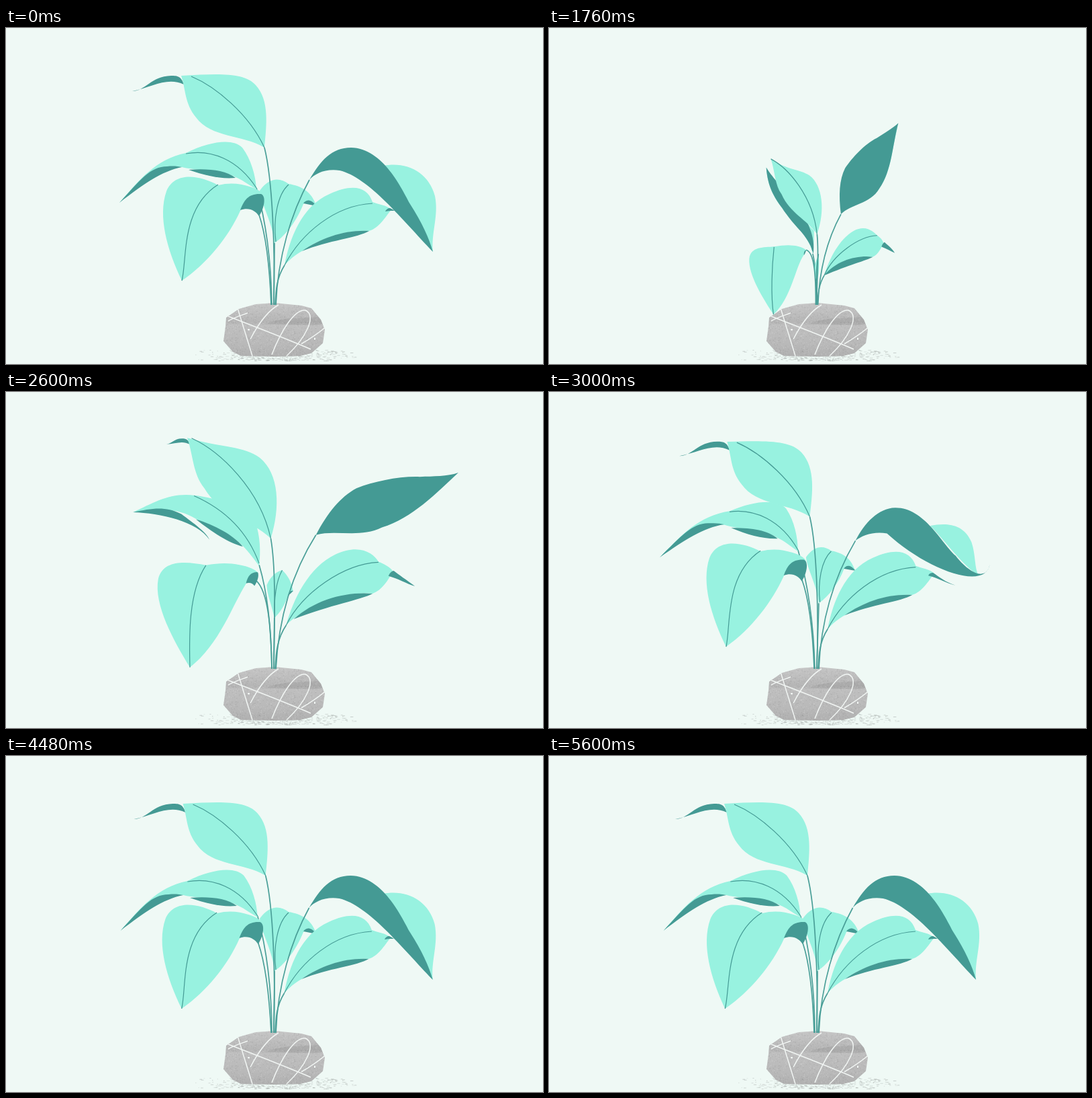
Write an HTML page with a canvas that moves like this. It is 800 by 500 pixels and loops after 5680 ms.

```html
<!DOCTYPE html>
<html lang="en">
<head>
<meta charset="utf-8">
<title>Growing plant</title>
<style>
html, body { margin: 0; width: 100%; height: 100%; overflow: hidden; background: #eff9f5; }
canvas { display: block; }
</style>
</head>
<body>
<canvas id="stage" width="800" height="500"></canvas>
<script>
const ctx = document.getElementById('stage').getContext('2d');
const LOOP = 5680, REST = 3520;
const LIGHT = '#98f2e0', DARK = '#449a94', STEM = '#4a9f98';

const nums = s => s.split(/[\s|\/]+/).map(Number);

// Affine map that carries the axis a-b onto A-B; k scales the width.
function carry(x, y, [ax, ay], [bx, by], [Ax, Ay], [Bx, By], k) {
  const vx = bx - ax, vy = by - ay, len2 = vx * vx + vy * vy;
  const u = ((x - ax) * vx + (y - ay) * vy) / len2;
  const w = k * (vx * (y - ay) - vy * (x - ax)) / len2;
  return [Ax + u * (Bx - Ax) - w * (By - Ay), Ay + u * (By - Ay) + w * (Bx - Ax)];
}

// Move a leaf so that its blade runs from base to tip; the stem follows.
function regrow(pose, base, tip, k = 1) {
  const root = pose.slice(0, 2), base0 = pose.slice(6, 8), tip0 = pose.slice(8, 10), out = [];
  for (let i = 0; i < pose.length; i += 2) {
    const [x, y] = [pose[i], pose[i + 1]];
    out.push(...(i < 8 ? carry(x, y, root, base0, root, base, 1)
                       : carry(x, y, base0, tip0, base, tip, k)));
  }
  return out;
}

const shrink = (pose, sx, sy) => pose.map((v, i) => i % 2 ? 412 + (v - 412) * sy : 399 + (v - 399) * sx);
const lean = (pose, d) => pose.map((v, i) => i % 2 ? v : v + d * (412 - pose[i + 1]) / 200);
const withTail = (pose, tail) => [...pose.slice(0, -tail.length), ...tail];

// Each part is a start point followed by cubic segments.
// Kinds: s stem, l light side, d dark side, v vein. The second part starts at the leaf tip.
function leaf({ kinds, open, rest, bud, sway, settle }) {
  const parts = rest.split('|').map(p => nums(p.trim()).length);
  const up = nums(open), end = nums(rest);
  const none = shrink(up, 0, 0);
  const keys = [
    [480, none],
    [1040, bud ? regrow(up, ...bud) : none],
    [1680, shrink(up, .52, .6)],
    [2280, up],
    ...settle(up, end),
    [REST, end],
    [4480, lean(end, sway[0])],
    [5600, lean(end, sway[1])]
  ];
  return { kinds, parts, keys };
}

const leaves = [
  leaf({ // left, middle height
    kinds: 'slvdd',
    open: '396 412 397 370 395 320 388 296|268 103/280 122 290 128 300 142/320 175 360 215 391 244/391 260 391 280 388 296/385 280 375 265 360 245/345 230 325 210 310 194/288 168 272 145 268 103|300 142 330 190 370 230 388 290|268 103/272 145 288 168 310 194/345 235 382 265 388 296/400 215 300 150 268 103|310 194/330 210 360 240 375 260/360 250 330 220 310 194',
    rest: '396 412 395 350 388 290 373 238|169 260/200 225 222 196 268 186/305 168 338 164 352 178/365 195 372 220 373 240/358 231 352 226 342 222/318 209 290 214 262 207/232 204 200 230 169 260|268 187 305 180 345 195 373 238|169 260/200 226 215 206 240 206/250 205 257 206 262 207/232 213 205 232 169 260|272 211/300 209 326 211 342 223/320 225 298 220 272 211',
    bud: [[394, 400], [385, 374], .4],
    sway: [2, 2],
    settle: (up, end) => [[2760, regrow(end, [372, 240], [156, 225])], [3000, regrow(end, [371, 235], [167, 248])]]
  }),
  leaf({ // small, centre
    kinds: 'slvd',
    open: '399 412 399 390 398 370 398 357|404 294/405 305 406 315 405 325/405 330 404 335 404 340/402 348 400 353 398 357/394 347 392 336 393 325/395 312 400 304 404 294|404 294 400 310 397 335 398 357|404 340/404 336 405 330 405 325/405 330 404 336 404 340',
    rest: '399 412 399 380 400 345 400 320|421 232/440 235 455 243 462 264/455 258 448 257 443 262/434 285 418 308 400 320/398 292 380 262 378 242/392 222 408 222 421 232|421 233 404 248 398 285 402 318|443 261/446 257 452 252 463 265/456 264 450 262 443 261',
    bud: [[398, 400], [403, 364], 1],
    sway: [0, 0],
    settle: (up, end) => [[3000, regrow(end, [402, 313], [421, 234])]]
  }),
  leaf({ // left, lowest
    kinds: 'slvd',
    open: '397 412 396 350 394 295 372 289|289 433/265 400 225 345 228 308/232 280 265 283 291 281/310 279 325 277 340 279/352 280 366 284 372 289/370 291 368 295 366 300/345 325 335 395 289 433|289 433 282 390 285 325 291 282|366 300/366 293 368 290 372 289/372 291 370 296 367 300/367 300 366 300 366 300',
    rest: '395 412 393 360 388 310 377 278|262 376/240 330 226 280 239 243/252 212 290 220 316 234/335 229 350 232 363 236/376 240 384 245 384 252/370 250 355 262 349 272/332 310 300 350 262 376|262 376 270 345 260 268 316 233|349 271/355 255 362 246 380 247/388 250 385 268 377 280/372 272 362 266 349 271',
    sway: [-2, 1.5],
    settle: (up, end) => [[3000, regrow(end, [377, 279], [263, 377])]]
  }),
  leaf({ // right, lower
    kinds: 'slvdd',
    open: '401 412 402 385 405 365 418 346|568 272/562 285 555 298 541 304/500 300 455 318 440 330/430 336 424 340 418 346/430 310 455 265 492 246/525 230 545 250 552 256/558 259 566 266 568 272|418 346 440 300 505 258 552 256|418 346/450 312 500 300 541 304/525 312 480 322 418 346|563 281/565 276 568 272 571 271/577 277 588 282 597 295/588 291 575 285 563 281',
    rest: '401 412 402 390 403 372 415 353|574 270/565 282 555 298 541 302/505 300 465 315 441 332/430 338 422 345 415 353/422 315 440 265 482 247/515 232 538 235 546 259/556 263 566 263 574 270|415 353 440 305 490 264 546 261|441 332/470 312 505 300 541 302/525 312 480 316 441 332|565 273/566 270 569 268 572 268/575 269 577 271 579 272/573 272 570 272 565 273',
    bud: [[402, 411], [403, 400], .6],
    sway: [-1.5, 0],
    settle: (up, end) => [[3000, withTail(end, nums('565 273/566 270 569 269 572 269/580 274 590 283 605 287/590 284 580 276 565 273'))]]
  }),
  leaf({ // right, tall
    kinds: 'sld',
    open: '402 412 405 340 422 270 460 208|607 2/600 30 595 50 590 75/582 110 570 140 555 150/570 110 590 60 607 2|460 208/454 165 456 130 471 104/490 80 520 50 552 36/572 24 592 14 607 2/592 50 590 110 558 150/535 185 485 185 460 208',
    rest: '402 412 405 340 425 275 452 226|636 333/633 305 645 280 639 250/630 215 597 198 562 205/575 235 610 290 636 333|452 226/468 198 485 178 514 178/562 179 590 240 602 262/620 290 630 312 636 333/590 285 540 222 497 212/475 209 460 217 452 226',
    bud: [[396, 401], [398, 357], .68],
    sway: [-.5, .5],
    settle: up => [
      [2560, regrow(up, [462, 212], [672, 105], .8)],
      [3000, nums('402 412 405 340 425 275 456 222|638 284/632 270 636 250 630 228/618 195 590 195 568 199/590 225 615 265 638 284|456 222/470 195 490 174 515 174/560 174 585 232 605 251/622 275 650 295 655 266/650 305 560 268 500 211/482 206 464 214 456 222')]
    ]
  }),
  leaf({ // left, top
    kinds: 'sdlv',
    open: '399 412 398 360 405 300 399 252|281 81/281 81 281 81 282 83/283 84 284 86 285 88/284 86 283 84 281 81|399 252/420 200 414 142 380 119/355 104 325 107 281 81/291 108 291 140 308 161/330 205 372 218 399 252|281 81 325 102 388 165 399 252',
    rest: '399 412 401 330 397 225 385 178|188 94/208 94 215 72 246 71/256 71 261 72 265 84/240 72 218 88 188 94|385 178/388 145 393 108 372 85/355 66 318 68 261 71/268 92 266 112 283 133/306 164 352 158 385 178|276 72 312 87 362 128 385 178',
    bud: [[394, 400], [379, 350], .5],
    sway: [1.5, 0],
    settle: (up, end) => [[3000, regrow(end, [388, 183], [191, 96])]]
  })
];

// Smooth interpolation through the keys, at rest from REST onwards.
function poseAt(keys, t) {
  let i = keys.findIndex(k => k[0] > t) - 1;
  if (i === -2) return keys[keys.length - 1][1];
  i = Math.max(0, i);
  const [t0, p0] = keys[i], [t1, p1] = keys[i + 1];
  const span = t1 - t0, u = Math.max(0, (t - t0) / span), u2 = u * u, u3 = u2 * u;
  const slope = (j, n) => j < 1 || keys[j][0] >= REST ? 0
    : (keys[j + 1][1][n] - keys[j - 1][1][n]) / (keys[j + 1][0] - keys[j - 1][0]);
  return p0.map((v, n) => (2 * u3 - 3 * u2 + 1) * v + (3 * u2 - 2 * u3) * p1[n]
    + span * ((u3 - 2 * u2 + u) * slope(i, n) + (u3 - u2) * slope(i + 1, n)));
}

function trace(p) {
  ctx.beginPath();
  ctx.moveTo(p[0], p[1]);
  for (let i = 2; i < p.length; i += 6) ctx.bezierCurveTo(...p.slice(i, i + 6));
}

function stroke(color, width) {
  ctx.strokeStyle = color;
  ctx.lineWidth = width;
  ctx.stroke();
}

function drawLeaf({ kinds, parts, keys }, t) {
  const pose = poseAt(keys, t);
  let at = 0;
  parts.forEach((n, i) => {
    trace(pose.slice(at, at += n));
    const kind = kinds[i];
    if (kind === 's') stroke(STEM, 1.7);
    else if (kind === 'v') stroke(DARK, 1.2);
    else {
      ctx.fillStyle = kind === 'l' ? LIGHT : DARK;
      ctx.fill();
    }
  });
}

function seeded(seed) {
  return () => (seed = seed * 16807 % 2147483647) / 2147483647;
}

function drawGround() {
  const rnd = seeded(71);
  for (let i = 0; i < 420; i++) {
    const x = 402 + (rnd() + rnd() - 1) * 125, y = 479 + 16 * rnd();
    ctx.fillStyle = `rgba(150,155,153,${.15 + .4 * rnd()})`;
    ctx.fillRect(x, y, 1 + 4 * rnd(), .9);
  }
}

const outline = nums('328 431 347 418 372 411 400 409 440 413 455 417 469 434 475 449 472 469 455 484 438 488 400 489 350 488 338 482 324 466 327 444');
const scratches = ['331 429/370 444 412 460 454 478', '345 417/352 440 360 465 367 488',
  '364 463/375 442 388 422 406 412', '396 486/410 450 430 418 446 420/464 428 446 462 418 488',
  '440 470/452 463 464 455 475 446', '331 436/341 430 350 428 360 424'].map(nums);

function drawStone() {
  ctx.save();
  ctx.beginPath();
  for (let i = 0; i < outline.length; i += 2) ctx.lineTo(outline[i], outline[i + 1]);
  ctx.closePath();
  ctx.clip();
  const g = ctx.createLinearGradient(0, 409, 0, 489);
  [[0, '#c6c6c6'], [.36, '#b5b5b5'], [.42, '#bfbfbf'], [.75, '#b9b9b9'], [1, '#b0b0b0']]
    .forEach(([at, color]) => g.addColorStop(at, color));
  ctx.fillStyle = g;
  ctx.fillRect(320, 405, 160, 90);
  trace(nums('385 441 415 428 440 434 476 428 476 434 476 438 476 441 445 444 415 440 385 441'));
  ctx.fillStyle = 'rgba(150,150,150,.35)';
  ctx.fill();
  const rnd = seeded(19);
  for (let i = 0; i < 1500; i++) {
    ctx.fillStyle = rnd() < .5 ? 'rgba(255,255,255,.16)' : 'rgba(110,110,110,.15)';
    ctx.fillRect(322 + 155 * rnd(), 408 + 82 * rnd(), 1.2, 1.2);
  }
  for (const s of scratches) {
    trace(s);
    stroke('#f1f5f3', 1.5);
  }
  ctx.fillStyle = '#f1f5f3';
  ctx.fillRect(360, 448, 3, 2);
  ctx.fillRect(459, 461, 2, 3);
  ctx.restore();
}

function draw(now) {
  const time = now % LOOP, step = time < 3000 ? 40 : 80;
  const t = Math.floor(time / step) * step;
  ctx.fillStyle = '#eff9f5';
  ctx.fillRect(0, 0, 800, 500);
  drawGround();
  drawStone();
  if (t < 80) leaves.forEach(l => drawLeaf(l, REST));
  else if (t >= 520) leaves.forEach(l => drawLeaf(l, t));
}

const start = performance.now();
function tick() {
  draw(performance.now() - start);
  requestAnimationFrame(tick);
}
tick();
</script>
</body>
</html>
```
